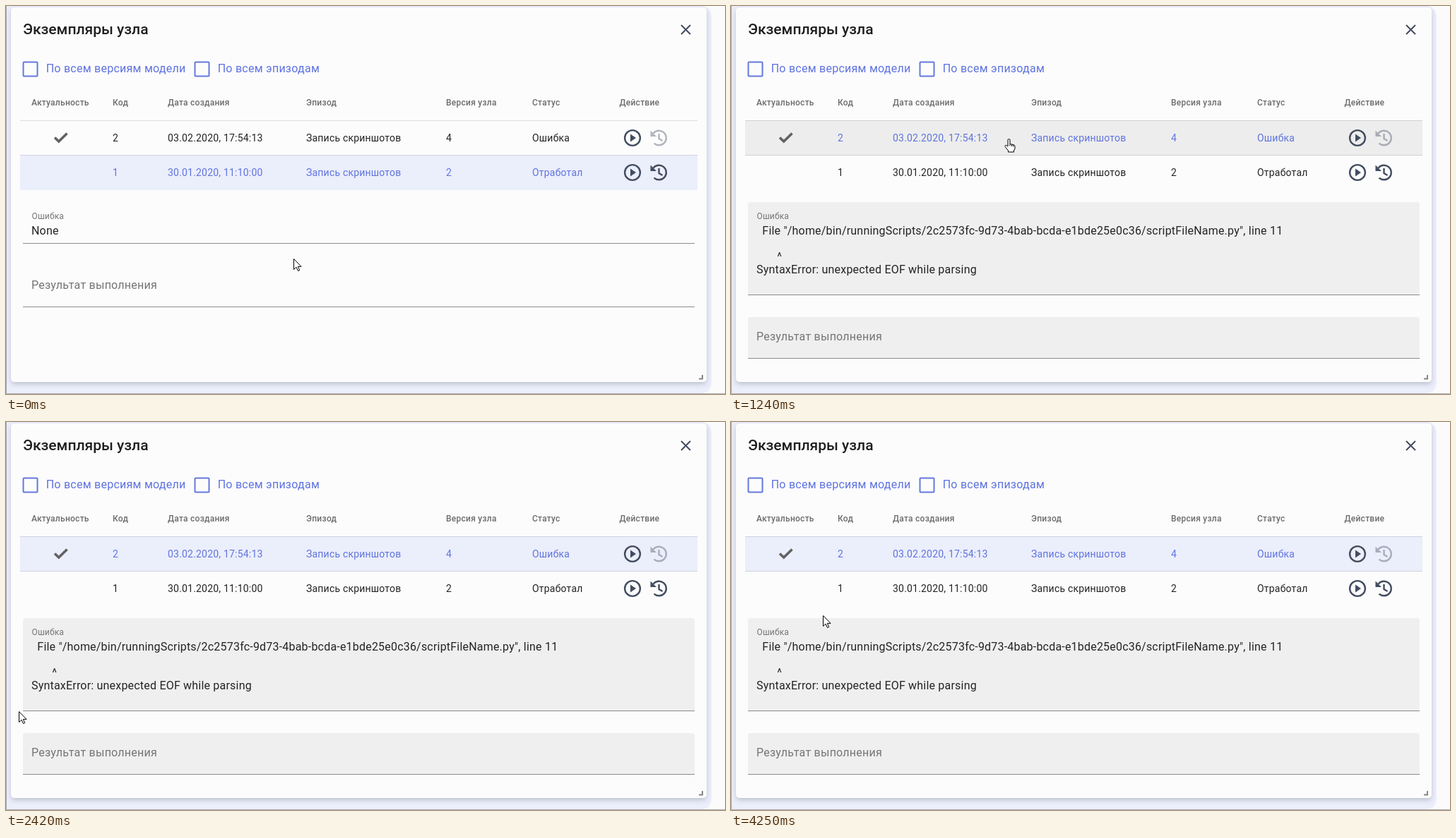
An HTML page for the animation above (4650 ms loop, 1018 by 550 pixels).

```html
<!DOCTYPE html>
<html lang="ru">
<head>
<meta charset="utf-8">
<title>Экземпляры узла</title>
<style>
  html, body { margin: 0; width: 100%; height: 100%; overflow: hidden; background: #fbfbfc; }
  svg { display: block; width: 1018px; height: 550px; }
  text { font: 16px Roboto, sans-serif; letter-spacing: .2px; fill: #242424; white-space: pre; }
  .title { font-size: 21px; font-weight: 500; letter-spacing: 0; fill: #1f1f1f; }
  .blue { fill: #5f73e0; letter-spacing: .25px; }
  .head text { font-size: 12px; font-weight: 500; letter-spacing: .25px; fill: #6c6c6c; }
  .row text { font-size: 14px; }
  .row .bg { fill: none; }
  .row.selected .bg { fill: #ebeefb; }
  .row.hover .bg { fill: #ededed; }
  .row.selected text { fill: #6074de; }
  .label { fill: #757575; letter-spacing: .25px; }
  .small { font-size: 12px; letter-spacing: .19px; }
  .field .bg { fill: none; }
  .field .line { fill: #8c8c8c; }
  .open .field .bg { fill: #efefef; }
  .field.hover .bg { fill: #e4e4e4; }
  .field.hover .line { fill: #3a3a3a; }
  .open .field.hover .bg { fill: #dedede; }
  .open .field.hover .line { fill: #222; }
  .long, .open .short { display: none; }
  .open .long { display: inline; }
  .open #result { transform: translateY(73px); }
  .icon { fill: none; stroke: #434d60; stroke-width: 2.4; }
  .icon .solid { fill: #434d60; stroke: none; }
  .disabled { opacity: .4; }
  .cursor { display: none; fill: #fff; stroke: #000; stroke-width: 1; stroke-linejoin: round; }
  .cursor.on { display: inline; }
</style>
</head>
<body>
<svg viewBox="0 0 1018 550">
  <defs>
    <filter id="shadow" x="-5%" y="-5%" width="110%" height="112%">
      <feDropShadow dx="0" dy="3" stdDeviation="3" flood-color="#303850" flood-opacity=".25"/>
    </filter>
    <g id="play" class="icon">
      <circle r="10.9"/>
      <path class="solid" d="M-3-5.6V5.6L5 0z"/>
    </g>
    <g id="history" class="icon">
      <path d="M-8-6.5A10.3 10.3 0 1 1-7 7.6M0-6V1L5 4"/>
      <path class="solid" d="M-12-10.5V-2H-3.5z"/>
    </g>
  </defs>

  <path d="M0 0H985Q999 2 999 18V532Q999 549 983 549H0z" fill="#eceefb"/>
  <path d="M.5 0V549.5H1018" fill="none" stroke="#a9a9b0"/>
  <rect x="7" y="2" width="985" height="531" rx="5" fill="#fcfcfc" filter="url(#shadow)"/>
  <path d="M986 523V528.5H981" fill="none" stroke="#858585" stroke-width="2"/>

  <text class="title" x="24" y="40">Экземпляры узла</text>
  <path d="M956 27 969 40M969 27 956 40" fill="none" stroke="#434d60" stroke-width="2"/>
  <g fill="none" stroke="#6478dc" stroke-width="2">
    <rect x="24.5" y="79.5" width="20" height="20" rx="1"/>
    <rect x="267.5" y="79.5" width="20" height="20" rx="1"/>
  </g>
  <text class="blue" x="56.7" y="94">По всем версиям модели</text>
  <text class="blue" x="299.7" y="94">По всем эпизодам</text>

  <g id="table"></g>
  <path d="M69 186.5 74.7 192 86.5 180.5" fill="none" stroke="#626262" stroke-width="3.6"/>

  <g id="ui">
    <g id="error" class="field">
      <g class="short">
        <path class="bg" d="M24 337V282q0-4 4-4H971q4 0 4 4V337z"/>
        <rect class="line" x="24" y="336" width="951" height="1"/>
        <text x="36" y="324">None</text>
      </g>
      <g class="long">
        <path class="bg" d="M24 410V282q0-4 4-4H971q4 0 4 4V410z"/>
        <rect class="line" x="24" y="409" width="951" height="1"/>
        <text x="36" y="324">  File "/home/bin/runningScripts/2c2573fc-9d73-4bab-bcda-e1bde25e0c36/scriptFileName.py", line 11</text>
        <text x="36" y="361">       ^</text>
        <text x="36" y="379">SyntaxError: unexpected EOF while parsing</text>
      </g>
      <text class="label small" x="36.5" y="301.5">Ошибка</text>
    </g>
    <g id="result" class="field">
      <path class="bg" d="M24 427V372q0-4 4-4H971q4 0 4 4V427z"/>
      <rect class="line" x="24" y="426" width="951" height="1"/>
      <text class="label" x="36" y="401">Результат выполнения</text>
    </g>
  </g>

  <g id="trail">
    <rect x="400" y="340" width="18" height="27" fill="#fff"/>
    <rect x="400" y="367" width="18" height="8" fill="#efefef"/>
  </g>

  <path id="arrow" class="cursor" d="M.5.5V15.5L4 12.2 6.5 17.5 8.7 16.6 6.3 11.4H11z"/>
  <path id="hand" class="cursor" d="M-1.5 10.5V1.5a1.5 1.5 0 0 1 3 0V7l5 1.2a2.5 2.5 0 0 1 2 2.5V13.5L7 16.5V18.5H-1V16.5L-5.3 11c-.8-1.5.6-2.8 2-1.8zM1.5 7V10M4 8V10.5M6.3 8.5V11"/>
  <path id="beam" class="cursor" d="M-3.5-7.5H-1L0-6.7 1-7.5H3.5M0-6.7V6.7M-3.5 7.5H-1L0 6.7 1 7.5H3.5" style="fill:none"/>
</svg>

<script>
  const $ = id => document.getElementById(id);
  const columns = [36, 151, 229, 425, 623, 745, 868.5];

  const cells = (values, y) => values
    .map((value, i) => `<text x="${columns[i]}" y="${y}">${value}</text>`).join('');

  const row = (id, top, values, disabled) => `
    <g id="${id}" class="row">
      <rect class="bg" x="20" y="${top}" width="959" height="50"/>
      <rect x="20" y="${top}" width="959" height="1" fill="#000" opacity=".12"/>
      ${cells(values, top + 30)}
      <use href="#play" x="887" y="${top + 25}"/>
      <use href="#history" x="924.5" y="${top + 25}" class="${disabled ? 'disabled' : ''}"/>
    </g>`;

  const headings = ['Актуальность', 'Код', 'Дата создания', 'Эпизод', 'Версия узла', 'Статус', 'Действие'];
  $('table').innerHTML = `<g class="head">${cells(headings, 141)}</g>`
    + row('row2', 162, ['', 2, '03.02.2020, 17:54:13', 'Запись скриншотов', 4, 'Ошибка'], true)
    + row('row1', 211, ['', 1, '30.01.2020, 11:10:00', 'Запись скриншотов', 2, 'Отработал'], false);

  // start time, cursor shape, x, y, hovered element
  const steps = [
    [0, 'arrow', 407, 358],
    [310, 'arrow', 400, 341],
    [430, 'beam', 398.5, 287.5, 'error'],
    [580, 'hand', 396, 222],
    [720, 'hand', 394, 175, 'row2'],
    [840, 'hand', 393.5, 188.5, 'row2'],
    [1610, 'hand', 308, 230, 'row1'],
    [1730, 'hand', 210.5, 260.5, 'row1'],
    [1850, 'hand', 152, 260, 'row1'],
    [2000, 'hand', 115.5, 258, 'row1'],
    [2120, 'arrow', 62, 274],
    [2270, 'arrow', 7, 334],
    [2420, 'arrow', 18, 410],
    [2540, 'beam', 120, 470, 'result'],
    [2660, 'beam', 240, 462, 'result'],
    [2810, 'arrow', 300, 412],
    [2930, 'beam', 308, 323, 'error'],
    [3080, 'beam', 299.5, 302.5, 'error'],
    [3200, 'beam', 230, 296, 'error'],
    [3320, 'beam', 165, 288, 'error'],
    [3440, 'beam', 135.5, 282],
    [4250, 'arrow', 130, 274]
  ];
  const hoverable = ['row1', 'row2', 'error', 'result'];

  function draw() {
    const time = performance.now() % 4650;
    const [, shape, x, y, hovered] = steps.findLast(step => step[0] <= time);
    const open = time >= 1240;

    for (const id of ['arrow', 'hand', 'beam']) $(id).classList.toggle('on', id === shape);
    $(shape).setAttribute('transform', `translate(${x} ${y})`);
    for (const id of hoverable) $(id).classList.toggle('hover', id === hovered);
    $('row1').classList.toggle('selected', !open);
    $('row2').classList.toggle('selected', open);
    $('ui').classList.toggle('open', open);
    $('trail').style.display = time >= 430 && !open ? '' : 'none';
    requestAnimationFrame(draw);
  }
  draw();
</script>
</body>
</html>
```
